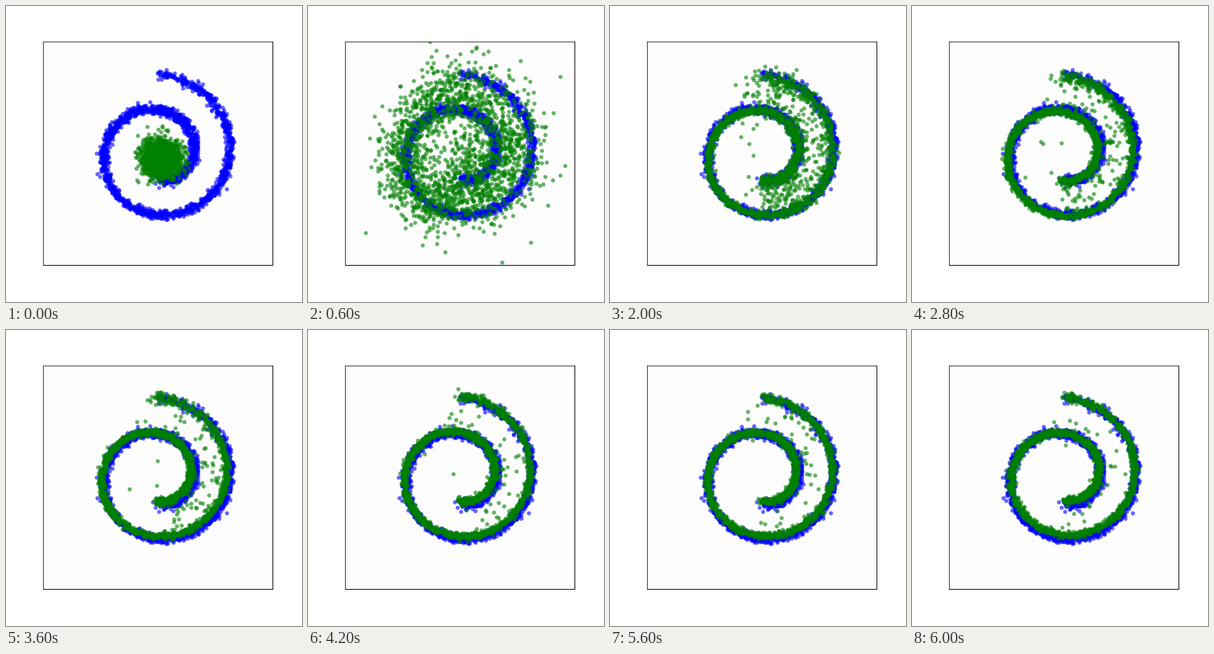
A matplotlib script that plays this animation: 432x432 px, repeating every 6.2 s.

```python
import numpy as np
import matplotlib.pyplot as plt
from matplotlib.animation import FuncAnimation

FRAMES, STEP = 31, 200
N = 2000
PI = np.pi

# Training stages: loop step and the values reached there
STAGES = [6, 10, 14, 18, 25, 30]
SHIFT_X = [0, 0, -0.5, -0.35, -0.3, 0]
SHIFT_Y = [0, -0.2, -0.2, 0.35, 0.35, 0.4]
SHIFT_R = [0, -0.15, -0.1, -0.15, 0, -0.3]
SHARP = [1, 4.5, 10, 20, 32, 36]
TAIL = [0.4, 0.9, 0.45, 0.35, 0.2, 0.15]


def polar(r, angle):
    return np.column_stack([r * np.cos(angle), r * np.sin(angle)])


def swiss_roll(rng):
    t = 1.5 * PI * (1 + 2 * rng.random(N))
    return polar(t, t) + rng.normal(0, 0.42, (N, 2))


def first_guess(rng):
    return rng.normal(0, 1.6, (N, 2)) + [0.55, -0.86]


def ring(rng, n, w):
    """Middle turn of the roll; early on it runs straight to the outer tip."""
    a = rng.uniform(0.5, 1.5 - 0.12 * (1 - w), n)
    early = 4 * np.exp((0.5 - a) / 0.16) - 2 * np.maximum(0, a - 1.2)
    return (a + 2) * PI + (1 - w) * early, a * PI


def sheet(rng, n, w, sharp):
    """Fill between the inner and outer arm, pushed apart as it sharpens."""
    a = rng.uniform(-0.5 - 0.18 * (1 - w), 0.5, n)
    up = np.maximum(0, 2 * a)
    arm = (a + 2) * PI
    early = 3.5 + 7.5 * up ** 2 + 28 * np.maximum(0, -0.5 - a)
    low = w * arm + (1 - w) * early
    high = arm + 2 * PI + (1 - w) * (1.2 * a - 0.5)
    s = rng.uniform(0.001, 0.999, n)
    s = 1 / (1 + ((1 - s) / s) ** sharp)
    lean = 0.5 * s * (1 - s) * up ** 2
    return low + s * (high - low), (a + lean) * PI, s * up ** 3


def generated(k):
    rng = np.random.default_rng(100 + k)
    if k == 0:
        return first_guess(rng)

    def at(values):
        return np.interp(k, STAGES, values)

    w = np.clip((k - 6) / 4, 0, 1)
    n = int(N * (1 / 3 + 0.05 * (1 - w)))
    r1, a1 = ring(rng, n, w)
    r2, a2, tip = sheet(rng, N - n, w, at(SHARP))

    # Wide scatter at the start that settles onto the roll
    burst = np.interp(k, [1, 2, 3, 4, 5, 6], [4.2, 3, 2, 1.2, 0.6, 0])
    sd1 = np.full(n, np.interp(k, [6, 10], [0.38, 0.3]) + burst)
    sd2 = np.interp(k, [6, 10, 14], [0.75, 0.4, 0.3]) + burst + at(TAIL) * tip
    wide = rng.random(N - n) < 0.1 * (1 - w)
    sd2 = sd2 * np.where(wide, 2, 1)

    pts = polar(np.r_[r1, r2] + at(SHIFT_R), np.r_[a1, a2])
    pts += rng.normal(0, 1, (N, 2)) * np.r_[sd1, sd2][:, None]
    pts += [at(SHIFT_X), at(SHIFT_Y)]
    pts += rng.normal(0, 0.06, 2)

    # A few strays in the hollow
    m = int(np.interp(k, [6, 10, 18, 30], [10, 10, 3, 1]))
    pts[:m] = polar(rng.uniform(1, 8, m), rng.uniform(0.4 * PI, 1.5 * PI, m))
    return rng.permutation(pts)


fig = plt.figure(figsize=(6, 6), dpi=72, facecolor="white")
ax = fig.add_axes([0.125, 0.125, 0.775, 0.755], facecolor="#fdfdfd")
ax.set(xlim=(-20, 20), ylim=(-20, 20), xticks=[], yticks=[])
ax.spines[["right", "bottom"]].set_linewidth(1)

style = dict(s=36, alpha=0.6, linewidths=0)
real = swiss_roll(np.random.default_rng(7))
ax.scatter(real[:, 0], real[:, 1], color="blue", **style)
start = generated(0)
cloud = ax.scatter(start[:, 0], start[:, 1], color="green", **style)


def update(k):
    cloud.set_offsets(generated(k))
    return (cloud,)


anim = FuncAnimation(fig, update, frames=FRAMES, interval=STEP,
                     repeat=True, repeat_delay=0)
plt.show()
```
